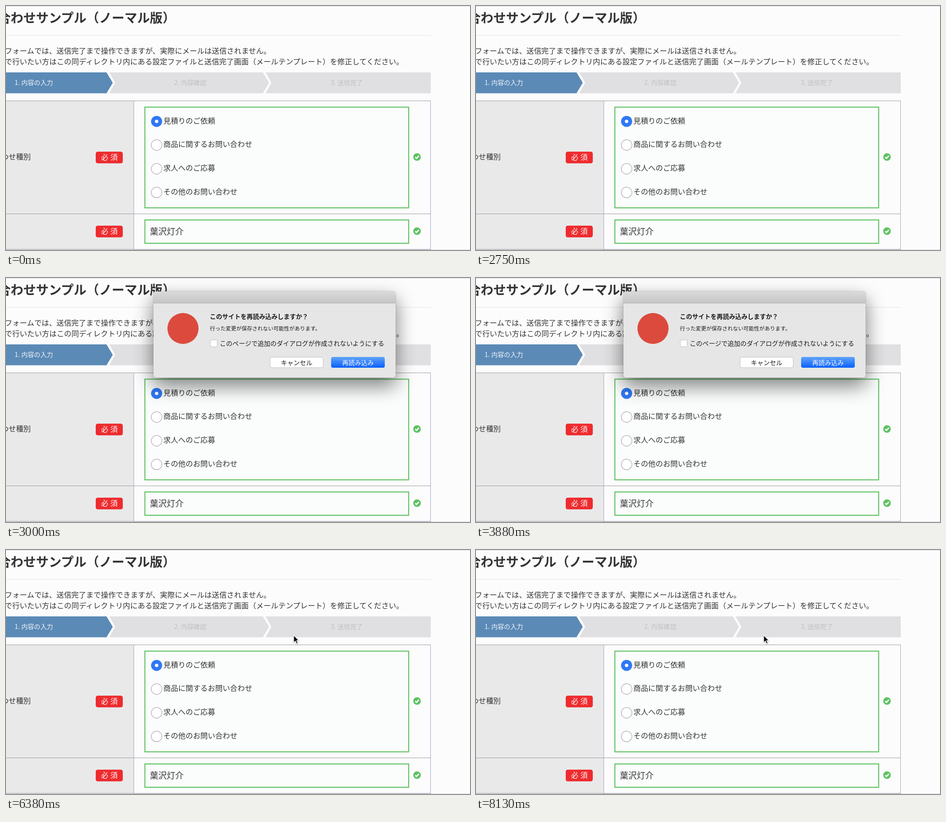
An HTML page for the animation above (8.26 s loop, 1029 by 544 pixels).

```html
<!DOCTYPE html>
<html lang="ja">
<head>
<meta charset="utf-8">
<title>Form</title>
<style>
html, body { margin: 0; width: 100%; height: 100%; overflow: hidden; background: #fcfcfd; }
svg { display: block; width: 1029px; height: 544px; }
text {
  font-family: "Noto Sans CJK JP", "Noto Sans CJK", sans-serif;
  font-size: 16.43px; fill: #333; text-spacing-trim: space-all; white-space: pre;
}
.step { font-size: 14.1px; fill: #c0c0c2; }
.dialog text { font-size: 14.05px; fill: #1c1c1c; }
.dialog {
  transform-origin: 595.5px 126px;
  animation: dialog 8260ms linear infinite;
}
.panel { filter: drop-shadow(0 18px 22px rgba(0, 0, 0, .42)) drop-shadow(0 0 1px rgba(0, 0, 0, .3)); }
.cursor { animation: cursor 8260ms infinite; filter: drop-shadow(0 1px 1px rgba(0, 0, 0, .3)); }
@keyframes dialog {
  0%, 33.9% { opacity: 0; transform: scale(.75); }
  34.87% { opacity: .89; transform: scale(.909); }
  36.2%, 66.7% { opacity: 1; transform: none; }
  68.8%, 100% { opacity: 0; transform: none; }
}
@keyframes cursor {
  0%, 49.99% { opacity: 0; transform: translate(700px, 300px); }
  50% { opacity: 1; transform: translate(700px, 300px); animation-timing-function: ease-out; }
  57%, 71.2% { opacity: 1; transform: translate(628px, 194px); animation-timing-function: ease-in-out; }
  74.2%, 100% { opacity: 1; transform: translate(638px, 190px); }
}
</style>
</head>
<body>
<svg viewBox="0 0 1029 544">
  <defs>
    <linearGradient id="bar" x2="0" y2="1">
      <stop stop-color="#dadada"/><stop offset="1" stop-color="#c5c5c5"/>
    </linearGradient>
    <linearGradient id="blue" x2="0" y2="1">
      <stop stop-color="#5fa5fb"/><stop offset="1" stop-color="#0a5ffb"/>
    </linearGradient>
    <g id="badge">
      <rect x="199" y="-13.3" width="60" height="26" rx="4.5" fill="#ee2b2e"/>
      <text x="211 231.5" y="4.8" style="fill:#fff;font-size:16px">必須</text>
    </g>
    <g id="ok">
      <circle r="8.4" fill="#5fc262"/>
      <path d="M-4 .2 L-1.3 3 L4.2 -2.8" fill="none" stroke="#fff" stroke-width="2.7"/>
    </g>
    <circle id="radio" cx="334" r="11.8" fill="#fff" stroke="#a6a6a6" stroke-width="1.2"/>
  </defs>

  <rect width="1029" height="544" fill="#fcfcfd"/>
  <path d="M0 .5 H1029 M0 543.5 H1029" stroke="#d3d3e6"/>
  <path d="M0 65.5 H942" stroke="#e2e2e2"/>
  <text x="-17.8" y="37.3" style="font-size:28.15px;font-weight:700">合わせサンプル（ノーマル版）</text>
  <text x="-2.5" y="106.2">フォームでは、送信完了まで操作できますが、実際にメールは送信されません。</text>
  <text x="-2.5" y="130.2">で行いたい方はこの同ディレクトリ内にある設定ファイルと送信完了画面（メールテンプレート）を修正してください。</text>

  <path d="M0 148 H942 V194.5 H0 Z" fill="#e0e0e2"/>
  <path d="M0 148 H223 L237 171.25 L223 194.5 H0 Z" fill="#5b8ab6"/>
  <g fill="#fcfcfd">
    <path id="chevron" d="M223 148 H229 L242 171.25 L229 194.5 H223 L237 171.25 Z"/>
    <use href="#chevron" x="346.5"/>
  </g>
  <text class="step" x="19" y="176" style="fill:#f0f5fa">1. 内容の入力</text>
  <text class="step" x="373" y="176">2. 内容確認</text>
  <text class="step" x="720" y="176">3. 送信完了</text>

  <rect y="212" width="283" height="332" fill="#e9e9e9"/>
  <path d="M0 211.5 H942 M0 463.5 H942 M0 542.5 H942" stroke="#9a98a0"/>
  <path d="M283.5 211 V544 M941.5 211 V544" stroke="#a5a1bb"/>
  <text x="-10.7" y="342.2">わせ種別</text>
  <use href="#badge" y="338"/>
  <use href="#badge" y="503"/>

  <g fill="#fbfdfc" stroke="#5fc262" stroke-width="2.2">
    <rect x="308" y="225.5" width="585" height="224.5"/>
    <rect x="308" y="477" width="585" height="52"/>
  </g>
  <circle cx="334" cy="257.3" r="12.3" fill="#2f78f6"/>
  <circle cx="334" cy="257.3" r="3.8" fill="#fff"/>
  <use href="#radio" y="310"/>
  <use href="#radio" y="363"/>
  <use href="#radio" y="415.7"/>
  <text x="349" y="261.7">見積りのご依頼</text>
  <text x="349" y="314.4">商品に関するお問い合わせ</text>
  <text x="349" y="367.1">求人へのご応募</text>
  <text x="349" y="419.8">その他のお問い合わせ</text>
  <text x="319" y="510" style="font-size:18.77px">葉沢灯介</text>
  <use href="#ok" x="911.5" y="336.7"/>
  <use href="#ok" x="911.5" y="502"/>

  <g class="dialog">
    <rect class="panel" x="327" y="30" width="537" height="192" rx="5" fill="#e6e6e6"/>
    <path d="M327 56 V35 Q327 30 332 30 H859 Q864 30 864 35 V56 Z" fill="url(#bar)"/>
    <path d="M327 56 H864" stroke="#b2b2b2"/>
    <circle cx="392.5" cy="112.5" r="34.5" fill="#db4a3d"/>
    <text x="452" y="91.3" style="font-size:13.65px;font-weight:700">このサイトを再読み込みしますか？</text>
    <text x="452" y="117.3" style="font-size:11.75px">行った変更が保存されない可能性があります。</text>
    <rect x="453" y="138" width="15.5" height="15.5" rx="3" fill="#fff" stroke="#bcbcbc"/>
    <text x="474" y="151.3">このページで追加のダイアログが作成されないようにする</text>
    <rect x="585.5" y="176.5" width="118" height="23.5" rx="4" fill="#fff" stroke="#bdbdbd"/>
    <text x="644.5" y="193.5" text-anchor="middle">キャンセル</text>
    <rect x="721" y="176" width="119" height="24" rx="4" fill="url(#blue)"/>
    <text x="780.5" y="193.5" text-anchor="middle" style="fill:#fff">再読み込み</text>
  </g>

  <path class="cursor" d="M0 0 V16.5 L3.8 13 L6.4 19 L9.2 17.8 L6.7 12 H11.7 Z"
    fill="#000" stroke="#fff" stroke-width="1.3"/>
</svg>
</body>
</html>
```
